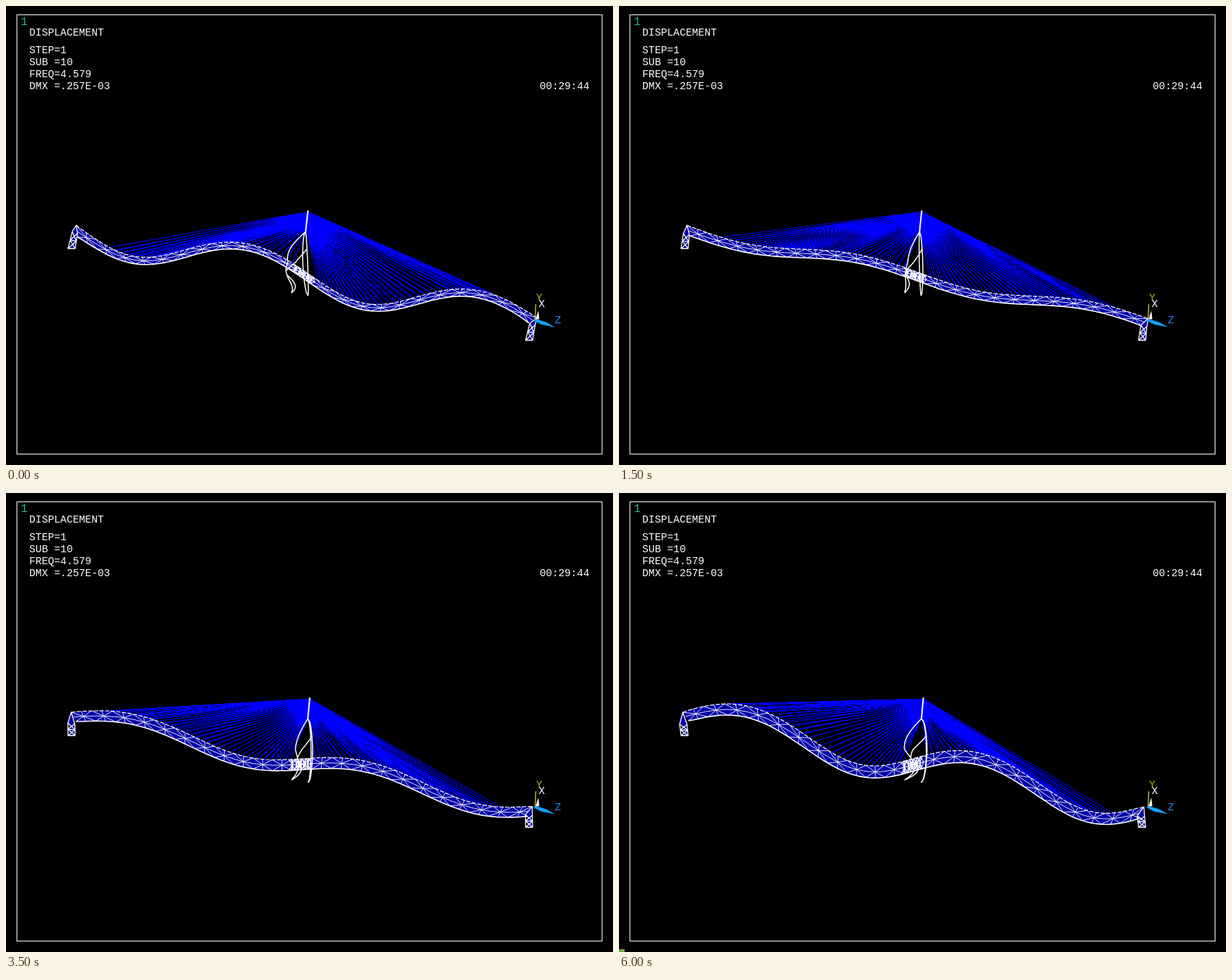
An HTML page for the animation above (6.5 s loop, 861 px wide and 651 px high).

```html
<!DOCTYPE html>
<html lang="en">
<head>
<meta charset="utf-8">
<title>Displacement</title>
<style>
  html, body { margin: 0; width: 861px; height: 651px; overflow: hidden; background: #000; }
  svg { display: block; }
  text { font-family: "Liberation Mono", "Courier New", monospace; font-size: 14.7px; fill: #fff; white-space: pre; }
  path { fill: none; stroke: #fff; stroke-linejoin: round; }
</style>
</head>
<body>
<svg width="861" height="651" viewBox="0 0 861 651">
  <rect width="861" height="651" fill="#000"/>
  <rect x="15.5" y="12.5" width="830" height="623" fill="none" stroke="#fffff0"/>
  <text x="21" y="27" style="font-size:16px;fill:#1fbf84">1</text>
  <text x="33" y="42">DISPLACEMENT</text>
  <text x="33" y="67">STEP=1</text>
  <text x="33" y="84">SUB =10</text>
  <text x="33" y="101">FREQ=4.579</text>
  <text x="33" y="118">DMX =.257E-03</text>
  <text x="757" y="118">00:29:44</text>

  <path id="cables" style="stroke:#00f" shape-rendering="crispEdges"/>
  <path id="skin" style="fill:#0000a8;stroke:none"/>
  <path id="truss" stroke-width=".9"/>
  <path id="top" stroke-width="1.2" stroke-dasharray="6 2"/>
  <path id="bottom" stroke-width="1.6"/>
  <path id="hub" stroke-width="1.1"/>
  <path id="piers" style="fill:#0000a8" stroke-width="1.3"/>
  <path id="legs" stroke-width="1.5"/>
  <path id="spire" stroke-width="2"/>

  <path d="M750.5 445L751.5 423" style="stroke:#c8c81e" stroke-width="1.4"/>
  <path d="M751 445L755 432L756.5 444Z" style="fill:#fff;stroke:none"/>
  <path d="M748 446L752 444L765 448L779 455.5L760 452Z" style="fill:#10a4ff;stroke:none"/>
  <text x="752" y="418" style="fill:#a8b020">Y</text>
  <text x="755.5" y="427">X</text>
  <text x="778.5" y="450" style="fill:#2d86f0">Z</text>
  <g id="corner">
    <rect y="647" width="8" height="4" fill="#4fae2c"/>
    <rect x="3" y="647" width="5" height="2" fill="#d08a3c"/>
  </g>
</svg>
<script>
const STEP = 500, LOOP = 6500, LAST = 9, REST = -1 / 9;
const { sin, cos, sqrt, abs, min, max, PI } = Math;
const el = id => document.getElementById(id);
const draw = (id, d) => el(id).setAttribute("d", d);
const fmt = p => p[0].toFixed(1) + " " + p[1].toFixed(1);
const line = pts => "M" + pts.map(fmt).join("L");
const mix = (a, b, k) => a + (b - a) * k;
const sample = (n, fn, from = 0, to = 1) =>
  Array.from({ length: n + 1 }, (_, i) => fn(mix(from, to, i / n)));

// Point of the deck: u along the span, f from the top (0) to the bottom (1)
function deck(u, f, a) {
  const x = 95 + 5 * f + u * (654 - 14 * f);
  const phase = (x - 95) / 657 * 4 * PI;
  const env = max(0, sin(PI * u)) ** 0.3;
  return [
    x + a * (4.5 - 3 * f) * cos(phase),
    311 + 0.203 * (x - 95) + 13.3 * f + a * (25.3 * sin(phase) + env * (1.5 - 3.8 * f))
  ];
}

// Two planes of cables on each side of the tower
function cables(a) {
  let d = "";
  for (const [outer, inner] of [[0.075, 0.47], [0.93, 0.53]])
    for (const f of [0, 0.5])
      sample(30, k => {
        const head = [430 - 1.7 * a - 2 * k, 292 + 26 * k];
        d += line([head, deck(mix(outer, inner, k), f, a)]);
      });
  return d;
}

// Triangles in two rows: roof and side face
function bracing(u0, u1, n, a) {
  const at = (i, f) => deck(mix(u0, u1, i / n), f, a);
  let d = "";
  for (let i = 0; i < n; i++) {
    const odd = i % 2;
    d += line([at(i, odd ? 0.5 : 0), at(i + 1, odd ? 0 : 0.5)]);
    d += line([at(i, odd ? 0.5 : 1), at(i + 1, odd ? 1 : 0.5)]);
    d += line([at(i, 0.5), at(i + 1, 0.5)]);
    if (odd) d += line([at(i, 0), at(i, 1)]);
  }
  return d;
}

// End support standing at x, y, hung from the end of the deck
function pier(head, x, y, a) {
  const l = [x + 2 + 4 * a, y - 20 - 4 * a], r = [x + 11 + 2.5 * a, y - 18.5 - 3 * a];
  const side = (p, q) => k => [mix(p[0], q[0], k), mix(p[1], q[1], k)];
  const left = side(l, [x, y]), right = side(r, [x + 10, y]);
  return line([head, l, left(1), right(1), r]) + "Z" +
    line([l, right(0.5), left(1)]) + line([r, left(0.5), right(1)]) + line([left(0.5), right(0.5)]);
}

// Tower members, v from the joint (0) down to the feet (1)
function legs(a) {
  const b = a - REST, top = 427 - 2 * a;
  const height = v => 320 + v * mix(87, 91, v);
  const bulge = v => sqrt(max(0, sin(PI * v)));
  const left = v => mix(top, 405, v)
    - 16 * abs(b) * sin(PI * v / 0.75) * (1 - v ** 6)
    - 9 * b * sin(2 * PI * max(0, v - 0.5));
  const right = v => mix(top, 428.5, v) + (1.5 - 6.5 * b) * bulge(v);
  const outer = v => mix(top, 428.5, v) + (5 - 3.5 * b) * bulge(v);
  const strut = v => mix(outer(v), left(v), (v - 0.28) / 0.36);
  const foot = v => left(v) + 5 * sin(PI * (v - 0.7) / 0.3);
  const trace = (x, from, to, y) => line(sample(20, v => [x(v), y(v)], from, to));
  const short = v => 320 + 87 * v;
  return trace(left, 0, 1, short) + trace(foot, 0.7, 1, short) + trace(strut, 0.28, 0.64, short)
    + trace(right, 0, 1, height) + trace(outer, 0, 1, height);
}

function pose(a) {
  const edge = f => sample(88, u => deck(u, f, a));
  const top = edge(0), bottom = edge(1);
  draw("cables", cables(a));
  draw("skin", line([...top, ...bottom.slice().reverse()]) + "Z");
  draw("truss", bracing(0, 1, 46, a));
  draw("top", line(top));
  draw("bottom", line(bottom));
  draw("hub", bracing(0.472, 0.522, 7, a) + bracing(0.476, 0.518, 10, a));
  draw("piers", pier(top[0], 88, 344, a) + pier(top[88], 737, 474, a));
  draw("legs", legs(a));
  draw("spire", line([[430 - 1.7 * a, 290], [427 - 2 * a, 320]]));
}

let shown = -1;
function tick() {
  const step = Math.floor(performance.now() % LOOP / STEP);
  if (step !== shown) {
    shown = step;
    pose(1 - 2 * min(step, LAST) / LAST);
    el("corner").style.display = step > LAST ? "" : "none";
  }
  requestAnimationFrame(tick);
}
tick();
</script>
</body>
</html>
```
